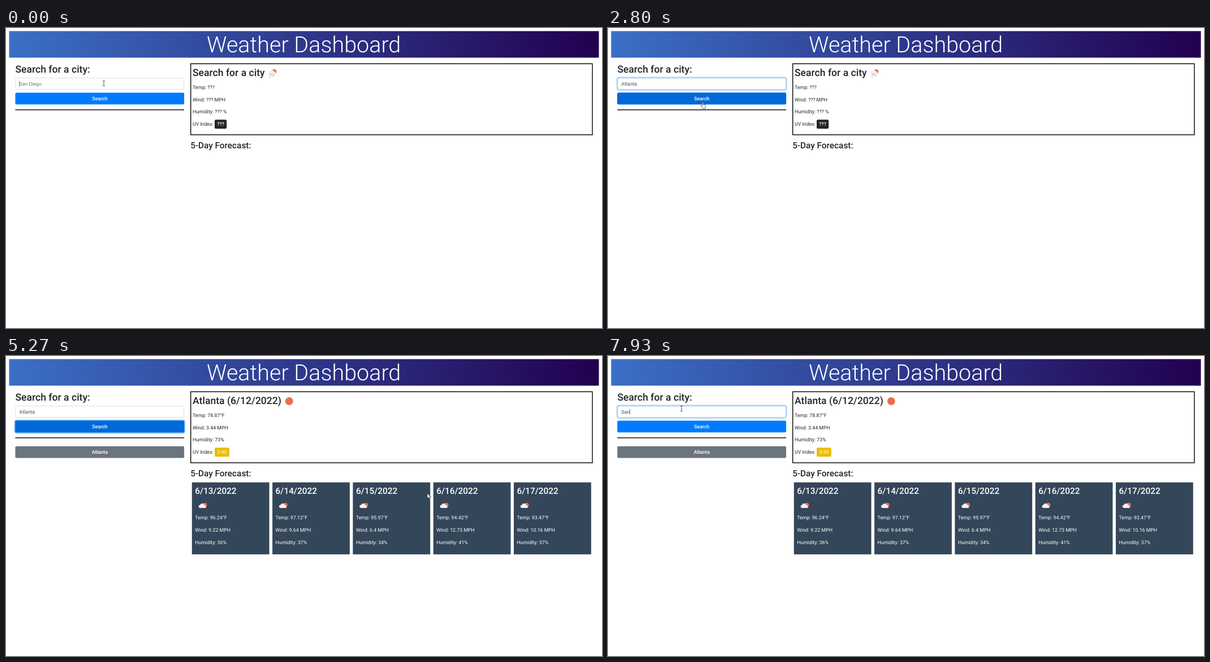
Animation of 1054x531 px, one loop 8000 ms. Source, as an HTML page:

```html
<!DOCTYPE html>
<html lang="en">
<head>
<meta charset="utf-8">
<title>Weather Dashboard</title>
<style>
html, body { margin: 0; width: 100%; height: 100%; overflow: hidden; background: #fff; }
svg { display: block; width: 1054px; height: 531px; }
text { font: 400 8.78px Roboto, sans-serif; fill: #212529; text-rendering: geometricPrecision; }
.title { font-weight: 300; font-size: 39.53px; fill: #fff; }
.h2 { font-weight: 500; font-size: 17.57px; }
.h3 { font-weight: 500; font-size: 15.37px; }
.mid { text-anchor: middle; }
.bold { font-weight: 500; }
.white, .cards text { fill: #fff; }
.field { fill: #495057; }
.hint { fill: #6c757d; }
.sun { fill: #ec6e4c; }
.cloud { fill: #f2f2f2; }

/* Timeline: 1% = 80 ms. Hard switches use step-end, fades use linear. */
.step, .fade { animation: 8s infinite step-end; }
.fade { animation-timing-function: linear; }

.before { animation-name: before; }
.after { animation-name: after; }
.history { animation-name: history; }
.hint { animation-name: hint; }
.first { animation-name: first; }
.second { animation-name: second; }
.select { animation-name: select; }
.type { animation-name: type; }
.caret { animation-name: type, blink; }
.field-ring { animation-name: field-ring; }
.hover { animation-name: hover; }
.button-ring { animation-name: button-ring; }

@keyframes before { 0% { visibility: visible } 44.1% { visibility: hidden } }
@keyframes after { 0% { visibility: hidden } 44.1% { visibility: visible } }
@keyframes history { 0% { visibility: hidden } 38.3% { visibility: visible } }
@keyframes hint { 0% { visibility: visible } 11.6% { visibility: hidden } }
@keyframes first { 0% { visibility: hidden } 11.6% { visibility: visible } 96.6% { visibility: hidden } }
@keyframes second { 0% { visibility: hidden } 96.6% { visibility: visible } }
@keyframes select { 0% { visibility: hidden } 89.1% { visibility: visible } 96.6% { visibility: hidden } }
@keyframes blink {
  0% { opacity: 1 } 6.6% { opacity: 0 } 11.6% { opacity: 1 }
  32.8% { opacity: 0 } 96.6% { opacity: 1 }
}
@keyframes type {
  0% { transform: translateX(0) }
  11.6% { transform: translateX(5.8px) }
  15% { transform: translateX(8.6px) }
  17.5% { transform: translateX(10.7px) }
  20.85% { transform: translateX(15.5px) }
  21.6% { transform: translateX(20.3px) }
  25% { transform: translateX(23.2px) }
  26.6% { transform: translateX(28.4px) }
  96.6% { transform: translateX(5.3px) }
  97.8% { transform: translateX(10.1px) }
  99.1% { transform: translateX(15.1px) }
}
@keyframes field-ring {
  0%, .85% { opacity: 0 } 1.7%, 37.5% { opacity: 1 }
  39%, 86.9% { opacity: 0 } 88.7%, 100% { opacity: 1 }
}
@keyframes hover { 0%, 33.4% { opacity: 0 } 35%, 86.9% { opacity: 1 } 88.7%, 100% { opacity: 0 } }
@keyframes button-ring { 0%, 37.5% { opacity: 0 } 39%, 86.9% { opacity: 1 } 88.7%, 100% { opacity: 0 } }

.pointer { animation: path 8s linear infinite, 8s step-end infinite; }
.beam { animation-name: path, beam; mix-blend-mode: difference; fill: none; stroke: #bbb; stroke-width: .9; }
.hand { animation-name: path, hand; fill: #fff; stroke: #222; stroke-width: .7; }
.arrow { animation-name: path, arrow; fill: #fff; stroke: #111; stroke-width: .6; }
@keyframes beam {
  0% { visibility: visible } 33.3% { visibility: hidden } 44.1% { visibility: visible }
  50.4% { visibility: hidden } 85.5% { visibility: visible }
}
@keyframes hand {
  0% { visibility: hidden } 33.3% { visibility: visible } 38.3% { visibility: hidden }
  83.6% { visibility: visible } 85.5% { visibility: hidden }
}
@keyframes arrow {
  0% { visibility: hidden } 38.3% { visibility: visible } 44.1% { visibility: hidden }
  50.4% { visibility: visible } 83.6% { visibility: hidden }
}
@keyframes path {
  0%, 32.4% { transform: translate(173px, 98px) }
  34% { transform: translate(168.5px, 126px) }
  35%, 38% { transform: translate(167.5px, 131px) }
  40% { transform: translate(225px, 175px) }
  42.5% { transform: translate(322px, 226px) }
  45% { transform: translate(347px, 239px) }
  46.6%, 49.9% { transform: translate(368px, 282.5px) }
  52% { transform: translate(430px, 180px) }
  54% { transform: translate(540px, 95px) }
  56% { transform: translate(597px, 75px) }
  58% { transform: translate(480px, 112px) }
  60%, 60.8% { transform: translate(401px, 147px) }
  62.4% { transform: translate(490px, 225px) }
  64% { transform: translate(630px, 284px) }
  65.8%, 68.3% { transform: translate(745px, 243px) }
  70% { transform: translate(880px, 282px) }
  71.5% { transform: translate(977px, 323px) }
  74% { transform: translate(640px, 305px) }
  76.6% { transform: translate(182px, 190px) }
  78.4%, 79% { transform: translate(207px, 283px) }
  80.8%, 83.3% { transform: translate(177px, 188px) }
  85.8% { transform: translate(126px, 96px) }
  87%, 100% { transform: translate(130px, 93px) }
}
</style>
</head>
<body>
<svg viewBox="0 0 1054 531">
  <defs>
    <linearGradient id="sky">
      <stop stop-color="#3b70c6"/>
      <stop offset="1" stop-color="#220050"/>
    </linearGradient>
    <g id="cloudy">
      <circle class="sun" cx="3.4" cy="-1" r="4"/>
      <path class="cloud" d="M-4.7 4.2a2.6 2.6 0 0 1-.3-5.2a3.9 3.9 0 0 1 7.2-.5a2.8 2.8 0 0 1 2.6 2.7a1.6 1.6 0 0 1-.4 3z"/>
    </g>
  </defs>

  <rect x="5.5" y="5.5" width="1043" height="47" fill="url(#sky)"/>
  <text class="title mid" x="526.7" y="43">Weather Dashboard</text>

  <!-- Search column -->
  <text class="h2" x="16.4" y="79">Search for a city:</text>
  <rect x="16.9" y="88.6" width="297.7" height="20.2" rx="2.2" fill="#fff" stroke="#ced4da" stroke-width=".8"/>
  <g class="fade field-ring" fill="none">
    <rect x="15.6" y="87.3" width="300.3" height="22.8" rx="3.2" stroke="#bfdeff" stroke-width="1.9"/>
    <rect x="16.9" y="88.6" width="297.7" height="20.2" rx="2.2" stroke="#80bdff" stroke-width=".8"/>
  </g>
  <text class="field step first" x="23.5" y="101.6">Atlanta</text>
  <text class="field step second" x="23.5" y="101.6">San</text>
  <rect class="step type" x="23.6" y="92" width="36" height="13.5" fill="#fff"/>
  <text class="step hint" x="23.5" y="101.6">San Diego</text>
  <g class="step select">
    <rect x="23.5" y="93.3" width="28.2" height="10.6" fill="#0078d7"/>
    <text class="white" x="23.5" y="101.6">Atlanta</text>
  </g>
  <rect class="step caret" x="23.4" y="93.4" width=".7" height="10.4" fill="#495057"/>

  <rect class="fade button-ring" x="15.5" y="113.6" width="300.5" height="22.6" rx="3.2" fill="none" stroke="#80bdff" stroke-width="1.9"/>
  <rect x="16.4" y="114.5" width="298.7" height="20.8" rx="2.2" fill="#007bff"/>
  <rect class="fade hover" x="16.4" y="114.5" width="298.7" height="20.8" rx="2.2" fill="#0069d9"/>
  <text class="mid white bold" x="165.8" y="128">Search</text>
  <rect x="16.4" y="144.1" width="298.7" height="1.4"/>
  <g class="step history">
    <rect x="16.4" y="159.7" width="298.7" height="20.8" rx="2.2" fill="#6c757d"/>
    <text class="mid white bold" x="165.8" y="173.1">Atlanta</text>
  </g>

  <!-- Current weather -->
  <rect x="326.7" y="63.3" width="710.3" height="125.7" fill="none" stroke="#000" stroke-width="1.4"/>
  <g class="step before">
    <text class="h2" x="330" y="84.7">Search for a city</text>
    <circle class="sun" cx="474.3" cy="77" r="3.9"/>
    <path class="cloud" d="M466.5 82.2a2.6 2.6 0 0 1-.3-5.2a3.9 3.9 0 0 1 7.2-.5a2.8 2.8 0 0 1 2.6 2.7a1.6 1.6 0 0 1-.4 3z"/>
    <path d="M467.4 81.2l-.6 1.2m3.3-1.8l-.6 1.2m3.2-.4l-.6 1.2m-3.2.3l-.6 1.2m3.6.2l-.6 1.2m3-1.8l-.6 1.2m-6.4 1.2l-.6 1.2" stroke="#48484a" stroke-width=".9"/>
    <text x="330" y="107.5">Temp: ???</text>
    <text x="330" y="129.5">Wind: ??? MPH</text>
    <text x="330" y="151.4">Humidity: ??? %</text>
    <rect x="369" y="162.3" width="21.2" height="15.9" rx="2.2" fill="#212529"/>
    <text class="mid white bold" x="379.6" y="173.4">???</text>
  </g>
  <g class="step after">
    <text class="h2" x="330" y="84.7">Atlanta (6/12/2022)</text>
    <circle class="sun" cx="500.8" cy="80" r="6.9"/>
    <text x="330" y="107.5">Temp: 78.87°F</text>
    <text x="330" y="129.5">Wind: 3.44 MPH</text>
    <text x="330" y="151.4">Humidity: 73%</text>
    <rect x="369" y="162.3" width="25.9" height="15.9" rx="2.2" fill="#e9bd08"/>
    <text class="mid white" x="382" y="173.4">3.99</text>
  </g>
  <text x="330" y="173.4">UV Index:</text>

  <text class="h3" x="326.2" y="212.5">5-Day Forecast:</text>
  <g class="step after cards" id="cards"></g>

  <path class="pointer beam" d="M-2.2-4.4H-.6L0-3.9.6-4.4H2.2M0-4V4M-2.2 4.4H-.6L0 3.9.6 4.4H2.2"/>
  <path class="pointer hand" d="M-1 1Q-1-.1 0-.1T1 1V4.6L4.3 5.3Q5.3 5.6 5.3 6.8L4.6 9.6V11.6H-.4V10.4L-2.8 7.2Q-3.2 6 -2.2 5.8L-1 6.8Z"/>
  <path class="pointer arrow" d="M0 0V9L2.1 7.1 3.6 10.4 5 9.8 3.6 6.6H6.4Z"/>
</svg>
<script>
const days = [
  [96.24, 9.22, 36],
  [97.12, 9.64, 37],
  [95.97, 6.4, 34],
  [94.42, 12.73, 41],
  [93.47, 10.16, 37]
];
document.getElementById('cards').innerHTML = days.map(([temp, wind, humidity], i) => `
  <g transform="translate(${328.8 + 142.3 * i} 223.7)">
    <rect width="136.8" height="127.4" fill="#344659"/>
    <text class="h3" x="5.5" y="20">6/${13 + i}/2022</text>
    <use href="#cloudy" x="19.3" y="41"/>
    <text x="5.5" y="65.4">Temp: ${temp}°F</text>
    <text x="5.5" y="87.4">Wind: ${wind} MPH</text>
    <text x="5.5" y="109.3">Humidity: ${humidity}%</text>
  </g>`).join('');
</script>
</body>
</html>
```
